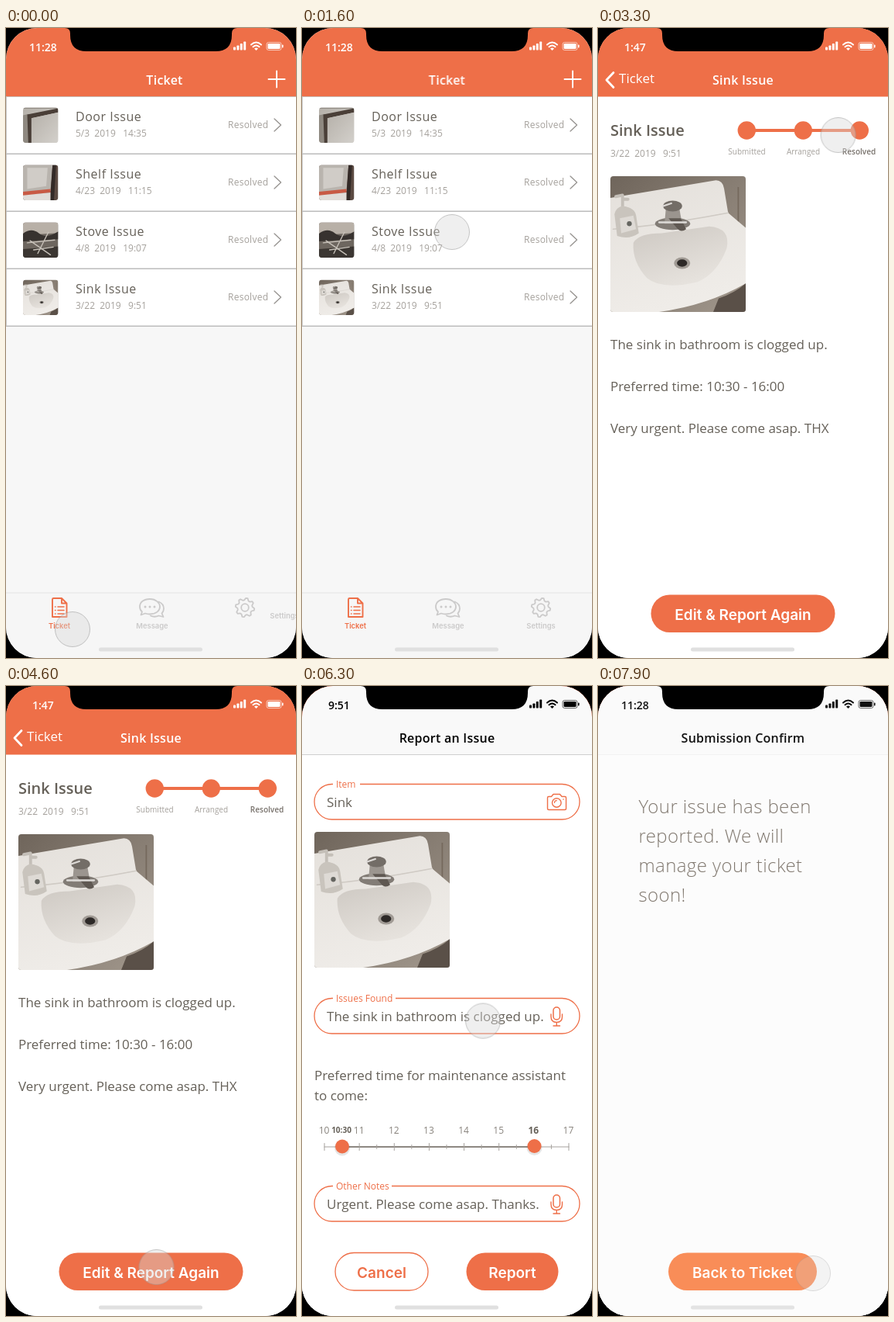
These frames come from a looping animation (375x812 px, 8000 ms). An HTML page:

```html
<!DOCTYPE html>
<html lang="en">
<head>
<meta charset="utf-8">
<title>Maintenance tickets</title>
<style>
  html, body { margin: 0; width: 100%; height: 100%; overflow: hidden; background: #000; }
  svg { display: block; }
  text { font-family: "Open Sans", "Noto Sans", sans-serif; white-space: pre; }
  .ui { font-family: Inter, Roboto, sans-serif; font-weight: 600; }
  .line { fill: none; stroke-linecap: round; stroke-linejoin: round; }
</style>
</head>
<body>
<svg id="stage" width="375" height="812" viewBox="0 0 375 812"></svg>
<script>
const ORANGE = '#ee6f48', INK = '#656058', SOFT = '#a5a19c', PALE = '#cbcaca';
const LOOP = 8000;

const rect = (x, y, w, h, fill, extra = '') =>
  `<rect x="${x}" y="${y}" width="${w}" height="${h}" fill="${fill}" ${extra}/>`;
const circle = (x, y, r, fill, extra = '') =>
  `<circle cx="${x}" cy="${y}" r="${r}" fill="${fill}" ${extra}/>`;
const ellipse = (x, y, rx, ry, fill) =>
  `<ellipse cx="${x}" cy="${y}" rx="${rx}" ry="${ry}" fill="${fill}"/>`;
const path = (d, color, width, extra = '') =>
  `<path class="line" d="${d}" stroke="${color}" stroke-width="${width}" ${extra}/>`;
const shape = (d, fill) => `<path d="${d}" fill="${fill}"/>`;
const text = (x, y, size, str, fill = INK, extra = '') =>
  `<text x="${x}" y="${y}" font-size="${size}" fill="${fill}" ${extra}>${str}</text>`;
const MID = 'text-anchor="middle"';
const title = (str, fill, extra = '') =>
  text(187.5, 72.5, 16, str, fill, `${MID} font-weight="600" letter-spacing=".25" ${extra}`);
const uiText = (x, y, size, str, fill, extra = '') =>
  text(x, y, size, str, fill, `class="ui" ${MID} ${extra}`);

function statusBar(time, x, color) {
  const bars = [4, 6, 8.5, 11].map((h, i) => rect(294 + i * 4.4, 28.5 - h, 3, h, color, 'rx=".8"')).join('');
  const wifi = path('M317 21.5Q323.5 15.5 330 21.5M319.5 24.3Q323.5 20.7 327.5 24.3', color, 2)
    + shape('M321 26.5Q323.5 24.5 326 26.5L323.5 29Z', color);
  const battery = rect(337, 18.5, 19, 10, 'none', `rx="2.5" stroke="${color}" stroke-opacity=".6"`)
    + rect(338.5, 20, 16, 7, color, 'rx="1.3"') + rect(357, 21.5, 1.5, 4, color, 'rx=".7"');
  return text(x, 29.5, 14, time, color, 'font-weight="600"') + bars + wifi + battery;
}

const homeBar = color => rect(120, 798.5, 134, 5, color, 'rx="2.5"');

function button(x, w, label, fill = ORANGE, outlined = false) {
  return rect(x, 730.5, w, 48.5, outlined ? '#fff' : fill, `rx="24.25" ${outlined ? `stroke="${fill}" stroke-width="1.3"` : ''}`)
    + uiText(x + w / 2, 762.5, 19, label, outlined ? fill : '#fff');
}

// Pictures are drawn on a 100 x 100 grid.
const pictures = {
  door: rect(0, 0, 100, 100, 'url(#plaster)') + shape('M0 22L16 18L22 100H0Z', '#8f8981')
    + shape('M12 20L100 2V14L24 30V100H15Z', '#4a3f38') + shape('M24 30L100 14V100H24Z', 'url(#plaster)')
    + rect(0, 0, 100, 3, '#8b857d'),
  shelf: rect(0, 0, 100, 100, '#5b4a42') + shape('M0 0H84L78 74L0 84Z', '#b9b4ae')
    + shape('M12 8H70L66 60L12 68Z', '#d0ccc7') + shape('M84 0H94L88 100H77Z', '#332a27')
    + shape('M0 76L78 68V78L0 88Z', '#c85a45') + shape('M0 86L78 78V100H0Z', '#e0dcd8'),
  stove: rect(0, 0, 100, 100, '#6d665f') + shape('M0 0H100V30L0 36Z', '#b8b0a7')
    + shape('M0 32Q24 14 45 31T100 26V48L0 54Z', '#37322f') + shape('M0 76L100 68V100H0Z', '#3b3632')
    + path('M20 52L78 92M72 28L42 88M12 58L90 50M30 78L86 70', '#c7c1b9', 3),
  sink: rect(0, 0, 100, 100, 'url(#wall)') + rect(94, 8, 1, 30, '#75695d')
    + shape('M0 16L78 3Q83 3 84 9L87 27L100 38V79Q72 95 36 100H0Z', 'url(#china)')
    + path('M2 39Q40 36 87 27', '#cfcac4', 1)
    + shape('M17 49Q21 42 38 42L73 37Q89 38 86 53Q79 72 64 78Q38 84 27 75Q16 63 17 49Z', 'url(#bowl)')
    + shape('M100 79Q92 86 80 90L76 100H100Z', '#5a5048')
    + ellipse(53, 64, 6, 4.3, '#a19b95') + ellipse(53, 64, 3.8, 2.7, '#2d2927')
    + ellipse(46, 35, 13, 4.5, '#827c76')
    + shape('M40 35L41 24Q46 19 51 24L53 35Z', '#9b958f') + shape('M43 31H52L56 39Q52 42 49 38Z', '#5f5852')
    + ellipse(46, 22, 7, 4, '#736d67') + path('M39 22L45 20M36 34H56', '#dddad7', 1.3)
    + path('M9 24V14L4 15M9 17H13', '#c4bfb8', 2.2)
    + shape('M3 28Q4 23 9 22Q18 23 19 29L21 42Q14 47 5 44Z', '#c9c4bd')
    + shape('M7 31L17 29L19 39L8 42Z', '#dedad5') + circle(14, 35, 1.8, '#656560')
};

function photo(name, x, y, size, corner) {
  return `<svg x="${x}" y="${y}" width="${size}" height="${size}" viewBox="0 0 100 100"><g clip-path="url(#${corner})">${pictures[name]}</g></svg>`;
}

function gear(cx, cy) {
  const pts = [];
  for (let i = 0; i < 32; i++) {
    const a = (i + .5) * Math.PI / 16, r = i % 4 < 2 ? 12.3 : 9.6;
    pts.push((cx + r * Math.sin(a)).toFixed(1) + ' ' + (cy - r * Math.cos(a)).toFixed(1));
  }
  return path('M' + pts.join('L') + 'Z', PALE, 1.8) + circle(cx, cy, 4.8, 'none', `stroke="${PALE}" stroke-width="1.8"`);
}

function tabBar() {
  const doc = path('M61.5 735H72L78.5 741.5V759H60V736.5Q60 735 61.5 735ZM72 735V741.5H78.5', ORANGE, 1.9)
    + path('M67 746H75M67 750.5H75M67 755H75M63.5 746H64M63.5 750.5H64M63.5 755H64', ORANGE, 1.6);
  const chat = path('M186 736C178 736 173 740 173 746Q173 750 176 752.5L174.5 756.5L180 754.5Q183 755.5 186 755.5C194 755.5 199 751 199 746S194 736 186 736Z', PALE, 1.8)
    + path('M197.5 739.5Q204 742 204 748.5Q204 752 201.5 754.5L203.5 759L197.5 757.5Q192 760 187 757.5', PALE, 1.8)
    + [180, 186, 192].map(x => circle(x, 746, 1.5, PALE)).join('');
  return rect(0, 728, 375, 84, '#f6f6f6') + rect(0, 727.5, 375, 1, '#e3e3e3')
    + doc + chat + gear(309, 747)
    + uiText(69, 774, 9.4, 'Ticket', ORANGE) + uiText(189, 774, 9.4, 'Message', PALE)
    + uiText(309, 774, 9.4, 'Settings', PALE, 'id="settings"') + homeBar('#e0e0e0');
}

function listPage() {
  const rows = [
    ['door', 'Door Issue', '5/3  2019   14:35'],
    ['shelf', 'Shelf Issue', '4/23  2019   11:15'],
    ['stove', 'Stove Issue', '4/8  2019   19:07'],
    ['sink', 'Sink Issue', '3/22  2019   9:51']
  ].map(([pic, name, date], i) => `<g transform="translate(0 ${88 + i * 74})">`
    + rect(0, 1, 375, 74, '#fff') + rect(0, 73.5, 375, 1.5, '#bcbcbc') + rect(0, 1, 1, 73, '#c8c8c8')
    + photo(pic, 22, 14.5, 45.5, 'thumb')
    + text(90, 32, 16, name, INK, 'letter-spacing=".5"') + text(90, 52, 12, date, SOFT)
    + text(287, 41, 12, 'Resolved', SOFT, 'letter-spacing=".25"')
    + path('M347 29L355.5 37L347 45', '#969390', 1.3) + '</g>').join('');
  return rect(0, 0, 375, 812, '#f7f7f7') + rows + rect(0, 0, 375, 88, ORANGE) + rect(0, 88, 375, 1, '#c9b9b3')
    + statusBar('11:28', 30, '#fff') + title('Ticket', '#fff', 'id="heading"')
    + path('M339.5 66H360.5M350 55.5V76.5', '#fff', 2) + tabBar();
}

function detailPage() {
  const steps = ['Submitted', 'Arranged', 'Resolved'].map((label, i) => {
    const x = 192 + i * 73, last = i === 2;
    return circle(x + .3, 132, 11.7, ORANGE)
      + text(x + (last ? -.5 : .5), 163, 10, label, last ? '#77716b' : SOFT, MID + (last ? ' font-weight="600"' : ''));
  }).join('');
  return rect(0, 0, 375, 812, '#fff') + rect(0, 0, 375, 88.5, ORANGE)
    + statusBar('1:47', 34, '#fff') + title('Sink Issue', '#fff')
    + path('M20 57.5L11 67L20 76.5', '#fff', 2.8) + text(27, 71, 17, 'Ticket', '#fff')
    + text(16, 138.5, 20, 'Sink Issue', INK, 'font-weight="600"') + text(16, 166, 12, '3/22  2019   9:51', SOFT)
    + rect(192, 130, 146, 4, ORANGE) + steps + photo('sink', 16, 191, 175, 'photo')
    + text(16, 414, 17, 'The sink in bathroom is clogged up.') + text(16, 468, 17, 'Preferred time: 10:30 - 16:00')
    + text(16, 522, 17, 'Very urgent. Please come asap. THX')
    + button(68.5, 238, 'Edit &amp; Report Again') + homeBar('#e0e0e0');
}

function field(y, label, gap, value) {
  return rect(16, y, 343, 45.5, '#fff', `rx="22.75" stroke="${ORANGE}" stroke-width="1.3"`)
    + rect(40, y - 2, gap, 4, '#fff') + text(44, y + 4.3, 12, label, ORANGE) + text(32, y + 29.5, 17, value);
}

const mic = y => rect(325, y, 8.5, 16, 'none', `rx="4.25" stroke="${ORANGE}" stroke-width="1.5"`)
  + path(`M322 ${y + 9}V${y + 12}Q322 ${y + 19.5} 329.25 ${y + 19.5}T336.5 ${y + 12}V${y + 9}M329.25 ${y + 19.5}V${y + 24}M325 ${y + 24}H333.5`, ORANGE, 1.4);

const camera = path('M319 142.5H322.5L325 139.5H333.5L336 142.5H340Q341.5 142.5 341.5 144V158Q341.5 159.5 340 159.5H319Q317.5 159.5 317.5 158V144Q317.5 142.5 319 142.5Z', ORANGE, 1.4)
  + circle(329.3, 150.5, 5.8, 'none', `stroke="${ORANGE}" stroke-width="1.4"`)
  + path('M326.5 150.5Q326.5 147.7 329.3 147.7M337.5 146H338.5', ORANGE, 1.2);

function slider() {
  let out = path('M29 594H345', '#a5a19d', 1.2) + path('M52 594H300', '#77716a', 1.5);
  for (let i = 0; i <= 14; i++) {
    const x = 29 + i * 22.57, h = i % 2 ? 2.5 : 4.5;
    out += path(`M${x} ${594 - h}V${594 + h}`, '#a5a19d', 1);
    if (i % 2 === 0) {
      const hour = 10 + i / 2, on = hour === 16;
      out += text(x - .5, 577, 12, hour, on ? INK : '#88837d', MID + (on ? ' font-weight="700"' : ''));
    }
  }
  out += text(51, 576, 10, '10:30', INK, `${MID} font-weight="700"`);
  for (const [x, y] of [[52, 593.5], [300.5, 593]]) out += circle(x, y + 2, 10, '#000', 'opacity=".1"') + circle(x, y, 9, ORANGE);
  return out;
}

function reportPage() {
  return rect(0, 0, 375, 812, '#fff') + rect(0, 0, 375, 88, '#f9f9f9') + rect(0, 88, 375, 1, '#cfcfcf')
    + statusBar('9:51', 34, '#000') + title('Report an Issue', '#000')
    + field(126.5, 'Item', 35, 'Sink') + camera + photo('sink', 16, 188, 175, 'photo')
    + field(402.5, 'Issues Found', 81, 'The sink in bathroom is clogged up.') + mic(414)
    + text(16, 508, 17, 'Preferred time for maintenance assistant') + text(16, 534, 17, 'to come:') + slider()
    + field(644.5, 'Other Notes', 76, 'Urgent. Please come asap. Thanks.') + mic(656)
    + button(43, 120, 'Cancel', ORANGE, true) + button(212.5, 119, 'Report') + homeBar('#e0e0e0');
}

function confirmPage() {
  const lines = ['Your issue has been', 'reported. We will', 'manage your ticket', 'soon!'];
  return rect(0, 0, 375, 812, '#fcfcfc') + rect(0, 0, 375, 89, '#fafafa') + rect(0, 88, 375, 1, '#f2f2f2')
    + statusBar('11:28', 30, '#111') + title('Submission Confirm', '#111')
    + lines.map((s, i) => text(52.5, 164 + i * 38, 24, s, '#80786f', 'font-weight="300" letter-spacing=".4"')).join('')
    + button(91, 192, 'Back to Ticket', '#f98d58') + homeBar('#e3e3e3');
}

const ramp = (id, from, to, dir = 'x2="1" y2="1"') =>
  `<linearGradient id="${id}" x1="0" y1="0" ${dir}><stop stop-color="${from}"/><stop offset="1" stop-color="${to}"/></linearGradient>`;
const corner = (id, r) => `<clipPath id="${id}"><rect width="100" height="100" rx="${r}"/></clipPath>`;

document.getElementById('stage').innerHTML = `<defs>
  ${ramp('plaster', '#b5b0a9', '#d3d0cb')}${ramp('wall', '#6f655b', '#a2988d')}
  ${ramp('china', '#e4e0db', '#efece8', 'x2=".3" y2="1"')}${ramp('bowl', '#cdc8c2', '#e6e2dd', 'x2=".5" y2="1"')}
  ${corner('thumb', 8)}${corner('photo', 2.2)}
  <clipPath id="screen"><rect width="375" height="812" rx="40"/></clipPath></defs>
  <g clip-path="url(#screen)">
    <g>${listPage()}</g>
    <g id="detail" opacity="0">${detailPage()}</g>
    <g id="report" opacity="0">${reportPage()}</g>
    <g id="confirm" opacity="0">${confirmPage()}</g>
    <g id="touch">${circle(0, 0, 22.5, '#d8d8d8', 'fill-opacity=".42" stroke="#999" stroke-opacity=".55"')}</g>
  </g>
  ${shape('M76 0Q83 0 83 7V9Q83 30 104 30H271Q292 30 292 9V7Q292 0 299 0Z', '#000')}`;

// Each step is [time, value, easing to the next step].
function play(id, prop, steps) {
  const frames = steps.map(([t, value, easing = 'linear']) => ({ offset: t / LOOP, [prop]: value, easing }));
  const anim = document.getElementById(id).animate(frames, { duration: LOOP, iterations: Infinity });
  anim.startTime = document.timeline.currentTime;
}
const at = (x, y) => `translate(${x}px, ${y}px)`;
const fadeIn = (id, start, end) =>
  play(id, 'opacity', [[0, 0], [start, 0, 'ease-in-out'], [end, 1], [LOOP, 1]]);

fadeIn('detail', 2150, 2450);
fadeIn('report', 4700, 5000);
fadeIn('confirm', 7500, 7800);
play('heading', 'transform', [[0, at(17.5, 0), 'ease-out'], [200, at(0, 0)], [LOOP, at(0, 0)]]);
play('settings', 'transform', [[0, at(51, -13), 'ease-out'], [200, at(0, 0)], [LOOP, at(0, 0)]]);
play('touch', 'opacity', [[0, 1], [7500, 1], [7800, .6], [LOOP, .6]]);
play('touch', 'transform', [
  [0, 86, 775], [700, 92, 755, 'ease-in-out'], [1600, 194, 263, 'ease-in-out'], [1950, 190, 345],
  [2300, 191, 348, 'ease-in-out'], [2850, 196, 140, 'ease-in-out'], [3300, 310.5, 138], [3500, 332, 140, 'ease-in-out'],
  [4500, 194, 745], [4600, 194.5, 749], [5200, 202.5, 753], [5400, 205, 748, 'ease-in-out'],
  [6250, 234, 430, 'ease-in-out'], [7100, 247, 661, 'ease-in-out'], [7400, 273, 754], [7900, 278, 757], [LOOP, 278, 757]
].map(([t, x, y, easing]) => [t, at(x, y), easing]));
</script>
</body>
</html>
```
